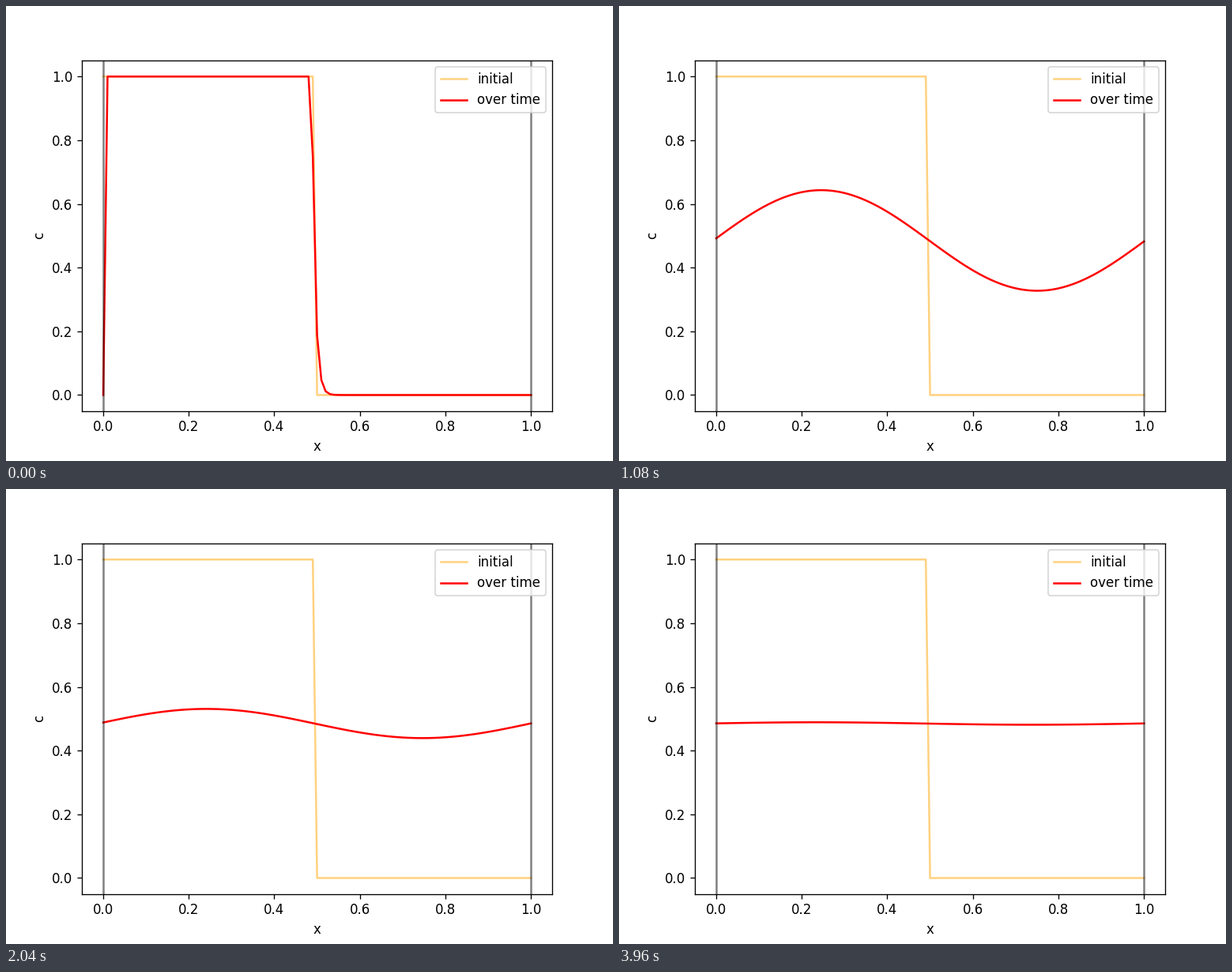
Recreate the animation shown at these times as a matplotlib script. Size 768 by 576 pixels, loop 4000 ms.

```python
import numpy as np
import matplotlib.pyplot as plt
from matplotlib.animation import FuncAnimation

N = 101            # grid points on [0, 1]
R = 0.25           # diffusion number
FRAMES = 100
STEPS = 40         # sweeps per frame

x = np.linspace(0, 1, N)
start = [1.0 if i < N // 2 else 0.0 for i in range(N)]


def relax(c, i):
    c[i] += R * (c[i - 1] - 2 * c[i] + c[(i + 1) % N])


def sweep(c):
    """One in-place diffusion step on the periodic grid."""
    for i in range(N):
        relax(c, i)


def solve():
    c = start[:]
    # the first step moves the interior and closes the ring at x = 0
    for i in range(1, N - 1):
        relax(c, i)
    c[0] = c[-1]
    states = [c[:]]
    for _ in range(FRAMES - 1):
        for _ in range(STEPS):
            sweep(c)
        states.append(c[:])
    return states


states = solve()

fig, ax = plt.subplots(figsize=(6.4, 4.8), dpi=120)
ax.plot(x, start, color="orange", alpha=0.5, label="initial")
line, = ax.plot(x, states[0], color="red", label="over time")
for edge in (0, 1):
    ax.axvline(edge, color="black", alpha=0.5)
ax.set(xlim=(-0.05, 1.05), ylim=(-0.05, 1.05), xlabel="x", ylabel="c")
ax.legend(loc="upper right")


def update(k):
    line.set_ydata(states[k])
    return line,


anim = FuncAnimation(fig, update, frames=FRAMES, interval=40,
                     repeat=True, repeat_delay=0)
plt.show()
```
